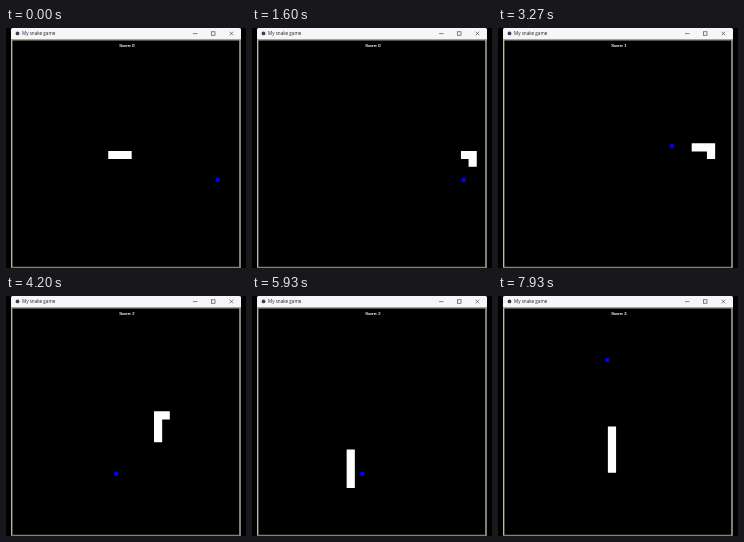
Write an HTML page that moves like this. It is 240 px wide and 240 px high and loops after 8 s.

```html
<!DOCTYPE html>
<html lang="en">
<head>
<meta charset="utf-8">
<title>Snake</title>
<style>
  html, body { margin: 0; width: 100%; height: 100%; overflow: hidden; background: #000; }
  svg { display: block; width: 100%; height: 100%; }
  .title { font: 4.6px "Open Sans", sans-serif; fill: #222; }
  .score { font: 4.1px "Liberation Sans", Arial, sans-serif; fill: #fff; stroke: #fff; stroke-width: .15; text-anchor: middle; }
</style>
</head>
<body>
<svg viewBox="0 0 240 240">
  <rect width="240" height="240"/>
  <g fill="none" stroke-width="1.3">
    <path d="M5.7 12V239M234 12V239" stroke="#c4c4b4"/>
    <path d="M5 12H235M5 239.3H235" stroke="#a3a392" stroke-width="1"/>
  </g>
  <path d="M5 11.6V1.5Q5 0 6.5 0H233.5Q235 0 235 1.5V11.6Z" fill="#f6f6f8"/>
  <circle cx="11.5" cy="5.4" r="1.9" fill="#34465e"/>
  <text class="title" x="16" y="7.1">My snake game</text>
  <g fill="none" stroke="#333" stroke-width=".6">
    <path d="M187 5.6h4.4M223.6 3.7l3.6 3.6m0-3.6l-3.6 3.6"/>
    <rect x="205.6" y="3.8" width="3.4" height="3.4"/>
  </g>
  <text class="score" id="score" x="120.9" y="18.6">Score: 0</text>
  <path id="snake" fill="#fff"/>
  <circle id="food" r="2.2" fill="#00f"/>
</svg>
<script>
  const LOOP = 8000, FRAME = 200 / 3;
  const STEP = 102.3, DELAY = 69;
  const CELL = 7.62, BLOCK = 8.2, CX = 121.6, CY = 127;
  const ROUTE = 'R13 D7 L1 U8 L8 D9 L7 U6 R1 D7 R1 U8';
  const DIRS = { R: [1, 0], L: [-1, 0], U: [0, -1], D: [0, 1] };
  const FOODS = [[211.7, 151.8], [174, 118], [110.2, 177.7], [109.4, 64]];
  const EATEN = [25, 34, 65]; // steps at which food is reached

  const [scoreEl, snakeEl, foodEl] = ['score', 'snake', 'food'].map(id => document.getElementById(id));

  // Cells visited by the head; the first two are the starting tail.
  const trail = [[-2, 0], [-1, 0], [0, 0]];
  for (const leg of ROUTE.split(' ')) {
    const [dx, dy] = DIRS[leg[0]];
    for (let i = +leg.slice(1); i > 0; i--) {
      const [x, y] = trail[trail.length - 1];
      trail.push([x + dx, y + dy]);
    }
  }
  const LAST = trail.length - 3;

  function cellPath([col, row]) {
    const x = CX + col * CELL - BLOCK / 2, y = CY + row * CELL - BLOCK / 2;
    return `M${x.toFixed(2)} ${y.toFixed(2)}h${BLOCK}v${BLOCK}h-${BLOCK}z`;
  }

  function draw(ms) {
    const time = Math.floor((ms % LOOP + 4) / FRAME) * FRAME;
    const step = Math.min(LAST, Math.max(0, Math.floor((time - DELAY) / STEP)));
    const score = EATEN.filter(n => n <= step).length;
    // A new segment only shows once the tail moves on.
    const size = 3 + EATEN.filter(n => n < step).length;
    snakeEl.setAttribute('d', trail.slice(step + 3 - size, step + 3).map(cellPath).join(''));
    foodEl.setAttribute('cx', FOODS[score][0]);
    foodEl.setAttribute('cy', FOODS[score][1]);
    scoreEl.textContent = 'Score: ' + score;
  }

  const start = performance.now();
  function tick() {
    draw(performance.now() - start);
    requestAnimationFrame(tick);
  }
  tick();
</script>
</body>
</html>
```
